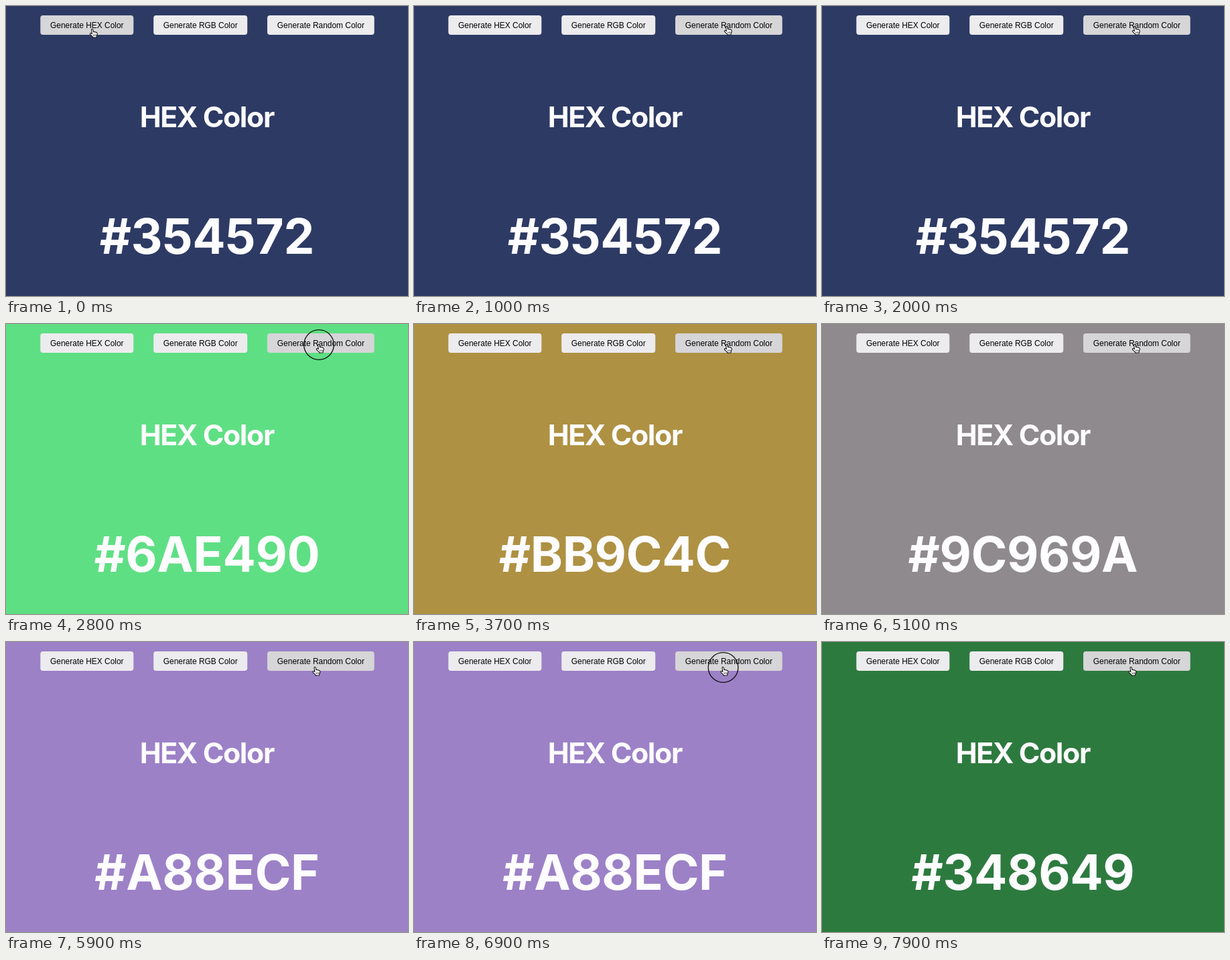
Recreate the animation shown at these times as an HTML page with a canvas. Size 600 px wide and 433 px high, loop 8 s.

```html
<!DOCTYPE html>
<html lang="en">
<head>
<meta charset="utf-8">
<title>Color generator</title>
<style>
  html, body { margin: 0; width: 100%; height: 100%; overflow: hidden; }
  canvas { display: block; }
</style>
</head>
<body>
<canvas id="stage" width="600" height="433"></canvas>
<script>
const ctx = document.getElementById('stage').getContext('2d');
const LOOP = 8000;

const buttons = [
  { x: 51.3, w: 139, label: 'Generate HEX Color' },
  { x: 220.2, w: 140, label: 'Generate RGB Color' },
  { x: 390, w: 159.7, label: 'Generate Random Color' }
];
const BUTTON_TOP = 14, BUTTON_HEIGHT = 29;

// The fill is the screen rendering of the color named by the code.
const colors = [
  { at: 0, code: '#354572', fill: '#2d3a64' },
  { at: 2600, code: '#6AE490', fill: '#5fdf84' },
  { at: 3600, code: '#BB9C4C', fill: '#ae9142' },
  { at: 5100, code: '#9C969A', fill: '#8f8a8d' },
  { at: 5800, code: '#A88ECF', fill: '#9c81c7' },
  { at: 7000, code: '#348649', fill: '#2d7a3f' }
];

const presses = [[2500, 2900], [3500, 3600], [5000, 5100], [5700, 5800], [6900, 7000]];

const moves = [
  { start: 100, end: 900, from: [129, 34.5], to: [467, 30.5], lift: 8 },
  { start: 5200, end: 5600, from: [467, 30.5], to: [461.5, 37.5], lift: 0 }
];

const smooth = p => p * p * (3 - 2 * p);

function pointerAt(t) {
  const move = t < moves[1].start ? moves[0] : moves[1];
  const raw = (t - move.start) / (move.end - move.start);
  const p = smooth(Math.min(1, Math.max(0, raw)));
  const mix = i => move.from[i] + (move.to[i] - move.from[i]) * p;
  return { x: mix(0), y: mix(1) - move.lift * 4 * p * (1 - p) };
}

function text(str, x, y, font, color, spacing = 0) {
  ctx.font = font;
  ctx.letterSpacing = spacing + 'px';
  ctx.fillStyle = color;
  // Centering counts the space after the last letter, so take it out.
  ctx.fillText(str, x + spacing / 2, y);
}

function isOver(button, p) {
  return p.x >= button.x && p.x <= button.x + button.w &&
    p.y >= BUTTON_TOP && p.y <= BUTTON_TOP + BUTTON_HEIGHT;
}

function drawButton(button, hovered) {
  ctx.fillStyle = hovered ? '#d6d5d7' : '#ecebee';
  ctx.beginPath();
  ctx.roundRect(button.x, BUTTON_TOP, button.w, BUTTON_HEIGHT, 4);
  ctx.fill();
  text(button.label, button.x + button.w / 2, 32.5,
    '11.95px "Liberation Sans", Arial, sans-serif', '#000');
}

const hand = new Path2D(
  'M-1.5 1 Q-1.5 -.2 -.4 -.2 Q.6 -.2 .8 .9 L1.5 4.2 Q2.7 3.4 3.5 4.5 ' +
  'Q4.7 3.8 5.4 5 Q7 4.5 7.2 6.3 Q7.4 8.5 6.2 10.4 L6.1 12.2 L.7 12.6 ' +
  'L.3 11.3 L-3.3 7.9 Q-4.1 6.6 -2.8 6.1 Q-1.8 5.9 -.6 7.1 Z');
const fingers = new Path2D('M1.4 8 L1.7 10.6 M3.2 7.8 L3.5 10.4 M5 7.7 L5.1 10.2');

function drawPointer(p) {
  ctx.save();
  ctx.translate(p.x, p.y);
  ctx.lineJoin = 'round';
  ctx.strokeStyle = '#151515';
  ctx.fillStyle = '#fff';
  ctx.lineWidth = 1.1;
  ctx.fill(hand);
  ctx.stroke(hand);
  ctx.lineWidth = 0.7;
  ctx.stroke(fingers);
  ctx.restore();
}

function drawRing(p) {
  ctx.strokeStyle = '#111';
  ctx.lineWidth = 1.3;
  ctx.beginPath();
  ctx.arc(p.x, p.y + 0.5, 22.3, 0, Math.PI * 2);
  ctx.stroke();
}

function draw(t) {
  const color = colors.findLast(c => t >= c.at);
  const pointer = pointerAt(t);
  ctx.textAlign = 'center';
  ctx.fillStyle = color.fill;
  ctx.fillRect(0, 0, 600, 433);
  for (const button of buttons) drawButton(button, isOver(button, pointer));
  text('HEX Color', 300.5, 181, '700 42.8px Inter, sans-serif', '#fdfcfe', -1.4);
  text(color.code, 300, 370, '700 73px Inter, sans-serif', '#fdfcfe', -0.4);
  if (presses.some(([down, up]) => t >= down && t < up)) drawRing(pointer);
  drawPointer(pointer);
}

const origin = performance.now();
function tick() {
  draw((performance.now() - origin) % LOOP);
  requestAnimationFrame(tick);
}
tick();
</script>
</body>
</html>
```
